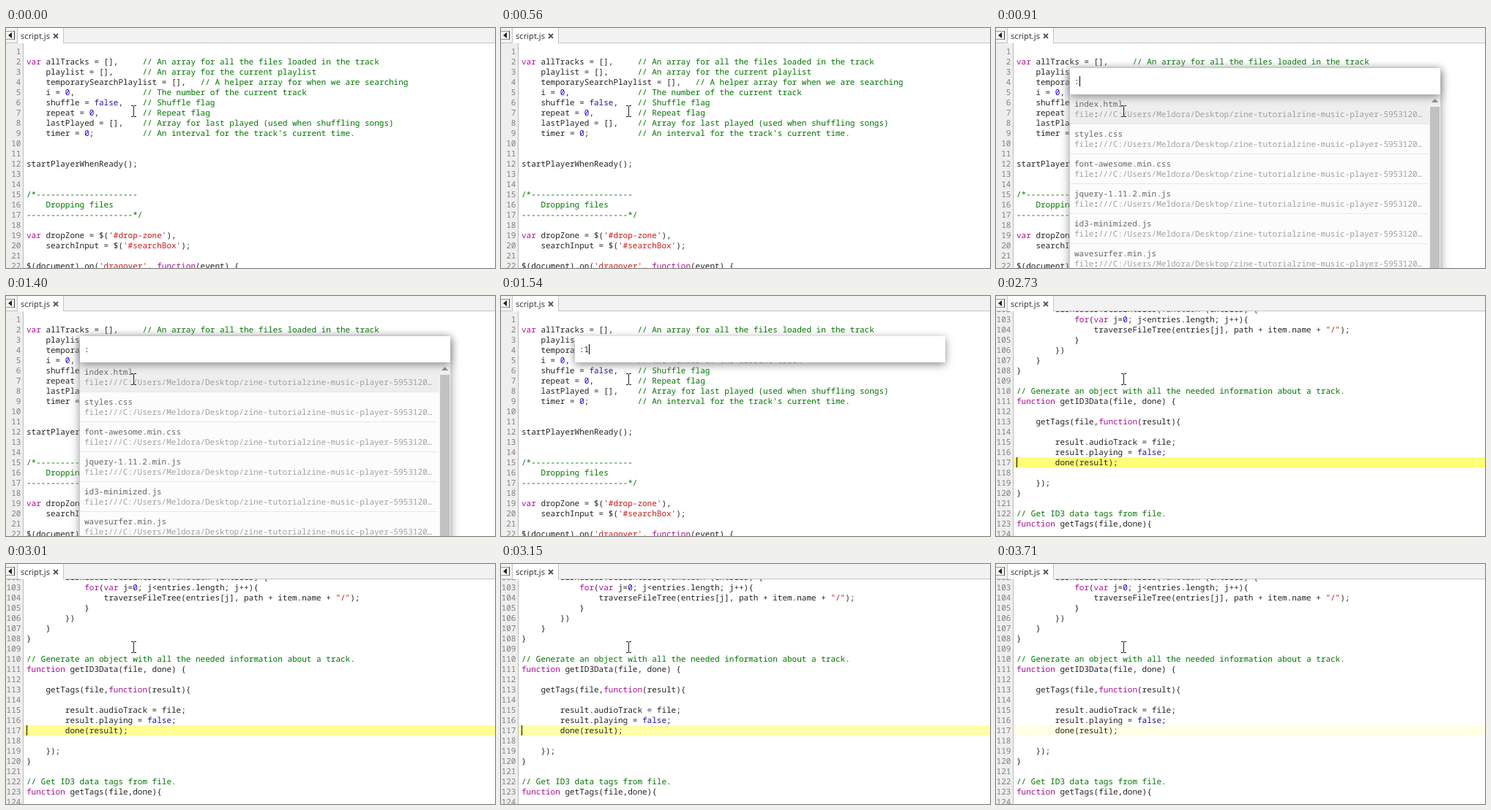
An HTML page with a canvas that plays this animation: 668 by 329 pixels, repeating every 3780 ms.

```html
<!DOCTYPE html>
<html lang="en">
<head>
<meta charset="utf-8">
<title>Go to line</title>
<style>
  html, body { margin: 0; width: 100%; height: 100%; overflow: hidden; background: #fff; }
  canvas { display: block; }
</style>
</head>
<body>
<canvas id="stage" width="668" height="329"></canvas>
<script>
const ctx = document.getElementById('stage').getContext('2d');
const W = 668, H = 329, LOOP = 3780, TICK = 70;
const CELL = 6.6, LINE = 14, CODE_X = 28, GUTTER = 23, BAR = 21;
const MONO = '11px "Noto Sans Mono", "DejaVu Sans Mono", monospace';
const UI = '11.2px "Open Sans", "Noto Sans", sans-serif';
const INK = '#222';

const topCode = `
var allTracks = [],     // An array for all the files loaded in the track
    playlist = [],      // An array for the current playlist
    temporarySearchPlaylist = [],   // A helper array for when we are searching
    i = 0,              // The number of the current track
    shuffle = false,    // Shuffle flag
    repeat = 0,         // Repeat flag
    lastPlayed = [],    // Array for last played (used when shuffling songs)
    timer = 0;          // An interval for the track's current time.


startPlayerWhenReady();


/*${'-'.repeat(21)}
    Dropping files
${'-'.repeat(22)}*/

var dropZone = $('#drop-zone'),
    searchInput = $('#searchBox');

$(document).on('dragover', function(event) {`;

const lowerCode = `        dirReader.readEntries(function (entries) {
            for(var j=0; j<entries.length; j++){
                traverseFileTree(entries[j], path + item.name + "/");
            }
        })
    }
}

// Generate an object with all the needed information about a track.
function getID3Data(file, done) {

    getTags(file,function(result){

        result.audioTrack = file;
        result.playing = false;
        done(result);

    });
}

// Get ID3 data tags from file.
function getTags(file,done){
`;

const files = ['index.html', 'styles.css', 'font-awesome.min.css',
  'jquery-1.11.2.min.js', 'id3-minimized.js', 'wavesurfer.min.js'];
const folder = 'file:///C:/Users/Meldora/Desktop/zine-tutorialzine-music-player-5953120…';

function rect(x, y, w, h, color) {
  ctx.fillStyle = color;
  ctx.fillRect(x, y, w, h);
}

function shape(points, fill, stroke) {
  ctx.beginPath();
  points.forEach(([x, y]) => ctx.lineTo(x, y));
  ctx.closePath();
  if (fill) { ctx.fillStyle = fill; ctx.fill(); }
  if (stroke) { ctx.strokeStyle = stroke; ctx.lineWidth = 1; ctx.stroke(); }
}

// Monospaced text, with each word placed on the character grid
function mono(text, x, y, color) {
  ctx.font = MONO;
  ctx.fillStyle = color;
  for (const word of text.matchAll(/\S+/g)) {
    ctx.fillText(word[0], x + word.index * CELL, y);
  }
}

function tokenColor(token) {
  if (/^\/[/*]/.test(token)) return '#007400';
  if (/^['"]/.test(token)) return '#c41a16';
  if (/^(var|for|function)$/.test(token)) return '#aa0d91';
  if (token === 'false') return '#221199';
  if (/^\d+$/.test(token)) return '#1c00cf';
  return INK;
}

// Splits code into coloured pieces with a row and a column
function tokenize(code) {
  const pieces = [];
  const pattern = /\/\*[\s\S]*?\*\/|\/\/.*|'[^']*'|"[^"]*"|[\w$]+|[^\s\w$]/g;
  for (const match of code.matchAll(pattern)) {
    const before = code.slice(0, match.index).split('\n');
    const color = tokenColor(match[0]);
    match[0].split('\n').forEach((text, i) => pieces.push({
      text, color, row: before.length - 1 + i, col: i ? 0 : before.at(-1).length
    }));
  }
  return pieces;
}

function makePage(code, first, top) {
  return { pieces: tokenize(code), rows: code.split('\n').length, first, top };
}

const startPage = makePage(topCode, 1, 25);
const goalPage = makePage(lowerCode, 102, 11);

function drawPage(page) {
  rect(0, 0, GUTTER, H, '#eee');
  rect(GUTTER, 0, 1, H, '#bbb');
  for (let i = 0; i < page.rows; i++) {
    const label = String(page.first + i);
    mono(label, 20.4 - label.length * CELL, page.top + i * LINE + 11, '#808080');
  }
  for (const p of page.pieces) {
    mono(p.text, CODE_X + p.col * CELL, page.top + p.row * LINE + 11, p.color);
  }
}

function drawBar() {
  rect(0, 0, W, BAR, '#f2f2f2');
  rect(0, BAR - 1, W, 1, '#c4c4c4');
  rect(15, 0, 64, BAR, '#fff');
  rect(15, 0, 1, BAR, '#c4c4c4');
  rect(78, 0, 1, BAR, '#c4c4c4');
  rect(0, 4, 12, 1, '#999');
  rect(0, 15, 12, 1, '#999');
  rect(11, 4, 1, 12, '#444');
  shape([[3, 10], [8, 6], [8, 14]], '#222');
  ctx.font = UI;
  ctx.fillStyle = '#303030';
  ctx.fillText('script.js', 20, 15);
  ctx.strokeStyle = '#555';
  ctx.lineWidth = 1.8;
  ctx.beginPath();
  ctx.moveTo(65, 8); ctx.lineTo(71, 14);
  ctx.moveTo(71, 8); ctx.lineTo(65, 14);
  ctx.stroke();
}

function shadowBox(x, y, w, h) {
  ctx.save();
  ctx.shadowColor = '#8c8c8c';
  ctx.shadowBlur = 12;
  ctx.shadowOffsetY = 3;
  rect(x, y, w, h, '#fff');
  ctx.restore();
}

function drawList() {
  shadowBox(101, 55, 506, 300);
  rect(101, 91, 506, H - 91, '#fcfcfc');
  rect(101, 91, 491, 41, '#eee');
  files.forEach((name, i) => {
    const y = 91 + i * 41;
    mono(name, 107, y + 17, '#666');
    mono(folder, 107, y + 31, '#a0a0a0');
    mono(':', 107 + 4 * CELL, y + 31, '#333');
    rect(101, y + 40, 489, 1, '#e8e8e8');
  });
  rect(592, 91, 15, H - 91, '#f1f1f1');
  shape([[595, 102], [599.5, 97], [604, 102]], '#8a8a8a');
  rect(593, 108, 13, H - 108, '#c1c1c1');
}

function drawDialog(query, caret, list) {
  if (list) drawList();
  shadowBox(101, 55, 506, 36);
  mono(query, 107, 77, INK);
  if (caret) rect(Math.round(107 + query.length * CELL), 66, 1, 14, '#000');
}

function drawBeam() {
  rect(174, 107, 1, 14, '#222');
  for (const y of [106, 121]) {
    rect(171, y, 3, 1, '#222');
    rect(175, y, 3, 1, '#222');
  }
}

function drawArrow() {
  shape([[180, 115], [180, 131], [183.5, 127.8], [186, 133], [188.2, 132],
    [186, 127], [190.8, 126.5]].map(([x, y]) => [x + .5, y + .5]), '#fff', '#111');
}

// cubic-bezier(.25, .1, .25, 1)
function ease(x) {
  const bez = (a, b, s) => 3 * a * s * (1 - s) ** 2 + 3 * b * s * s * (1 - s) + s ** 3;
  let lo = 0, hi = 1;
  for (let i = 0; i < 20; i++) {
    const mid = (lo + hi) / 2;
    if (bez(.25, .25, mid) < x) lo = mid; else hi = mid;
  }
  return bez(.1, 1, lo);
}

function render(t) {
  rect(0, 0, W, H, '#fff');
  if (t < 2730) {
    drawPage(startPage);
    if (t >= 140 && t < 560) rect(186, 109, 1, 14, '#000');
  } else {
    const fade = Math.round(120 + 135 * ease((t - 2690) / 2000));
    rect(GUTTER + 1, 221, W, LINE, `rgb(255,255,${fade})`);
    drawPage(goalPage);
    if (t < 3290) rect(CODE_X, 221, 1, LINE, '#000');
  }
  drawBar();
  if (t >= 910 && t < 2730) {
    const query = t < 1540 ? ':' : t < 2100 ? ':1' : t < 2310 ? ':11' : ':117';
    drawDialog(query, t < 1400 || t >= 1540, t < 1540);
  }
  if (t >= 2310 && t < 2730) drawArrow(); else drawBeam();
}

ctx.textRendering = 'geometricPrecision';
const start = performance.now();
function loop() {
  const t = (performance.now() - start) % LOOP;
  render(Math.floor(t / TICK) * TICK);
  requestAnimationFrame(loop);
}
loop();
</script>
</body>
</html>
```
